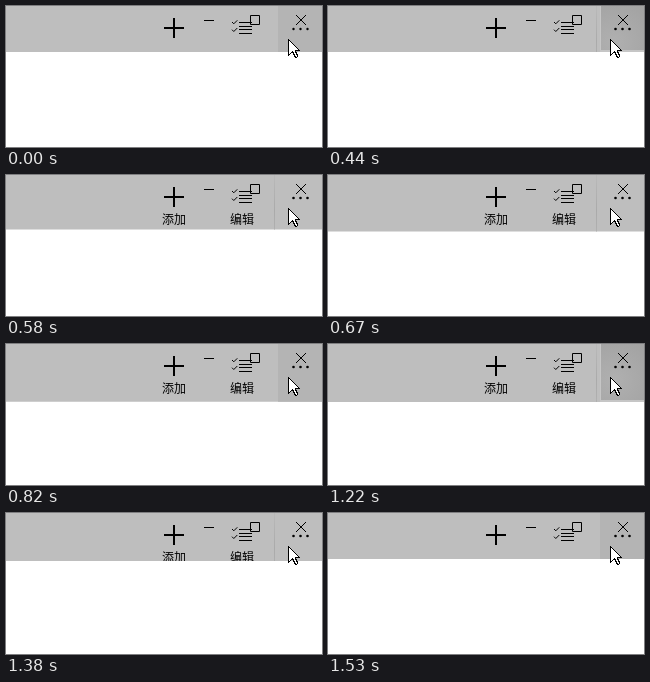
These frames come from a looping animation (316x141 px, 1610 ms). An HTML page:

```html
<!DOCTYPE html>
<html lang="zh-CN">
<head>
<meta charset="utf-8">
<title>Command bar</title>
<style>
html, body { margin: 0; width: 100%; height: 100%; overflow: hidden; background: #fff; }
svg { display: block; width: 316px; height: 141px; }
text { font: 12px "Noto Sans CJK SC", "Noto Sans CJK", sans-serif; text-anchor: middle; }
.ink { fill: none; stroke: #000; }
.crisp { shape-rendering: crispEdges; }
</style>
</head>
<body>
<svg viewBox="0 0 316 141">
  <defs>
    <clipPath id="clip"><rect id="clipBox" width="316" height="46"/></clipPath>
    <radialGradient id="glow" gradientUnits="userSpaceOnUse" cx="286" cy="36" r="46">
      <stop offset="0" stop-color="#b0b0b0"/>
      <stop offset="1" stop-color="#a2a2a2"/>
    </radialGradient>
    <linearGradient id="edge" gradientUnits="userSpaceOnUse" x1="0" y1="0" x2="0" y2="58">
      <stop offset="0" stop-color="#b9b9b9"/>
      <stop offset=".6" stop-color="#aaa"/>
      <stop offset="1" stop-color="#b0b0b0"/>
    </linearGradient>
  </defs>
  <rect width="316" height="141" fill="#fff"/>
  <g clip-path="url(#clip)">
    <rect width="316" height="58" fill="#bebebe"/>
    <rect id="hover" x="272" width="44" height="58" fill="#b4b4b4"/>
    <rect id="line" x="268" width="1" height="58" fill="url(#edge)"/>
    <g id="press">
      <rect x="272" width="44" height="58" fill="#c6c6c6"/>
      <rect id="pressBox" x="273" width="43" height="44" fill="url(#glow)"/>
    </g>
    <g id="labels">
      <text x="168" y="49">添加</text>
      <text x="236" y="49">编辑</text>
    </g>
  </g>
  <path class="ink" stroke-width="2" d="M158 22H178M168 12V32"/>
  <path class="ink" d="M198 14.5H208M244.5 9.5H253.5V18.5H244.5Z"/>
  <path class="ink crisp" d="M290 9L300 19M300 9L290 19"/>
  <path class="ink" d="M233 16.5H246M233 20.5H246M233 23.5H246M233 27.5H246"/>
  <path class="ink" d="M226 16L227.8 17.8L231.3 14.3M226 23.7L227.8 25.5L231.3 22"/>
  <g id="dots">
    <circle cx="287.5" cy="23"/>
    <circle cx="294.5" cy="23"/>
    <circle cx="301.5" cy="23"/>
  </g>
  <path class="crisp" transform="translate(282.5 33.5)" d="M0 0V16L4 12L7 18H8L9 17V16L7 12V11H11Z" fill="#fff" stroke="#000"/>
</svg>
<script>
const LOOP = 1610;
// start time, bar height, button state, labels shown, large dots
const steps = [
  [0, 46, "hover", 0, 0],
  [440, 46, "press", 0, 1],
  [520, 51, "line", 1, 1],
  [580, 54.4, "line", 1, 1],
  [670, 56.5, "line", 1, 1],
  [740, 57.4, "hover", 1, 1],
  [820, 57.8, "hover", 1, 1],
  [910, 58, "hover", 1, 1],
  [990, 58, "hover", 1, 0],
  [1220, 58, "press", 1, 1],
  [1290, 52, "line", 1, 1],
  [1380, 48, "line", 1, 1],
  [1450, 46.5, "hover", 1, 1],
  [1530, 46, "hover", 0, 1]
];
const el = id => document.getElementById(id);
const show = (id, on) => el(id).setAttribute("visibility", on ? "visible" : "hidden");

function draw(ms) {
  const t = ms % LOOP;
  const [, height, state, labels, large] = steps.findLast(s => s[0] <= t);
  el("clipBox").setAttribute("height", height);
  el("pressBox").setAttribute("height", height - 2);
  show("hover", state === "hover");
  show("press", state === "press");
  show("line", state !== "hover");
  show("labels", labels);
  for (const dot of el("dots").children) dot.setAttribute("r", large ? 1.3 : 1.2);
}

const start = performance.now();
function tick() {
  draw(performance.now() - start);
  requestAnimationFrame(tick);
}
tick();
</script>
</body>
</html>
```
